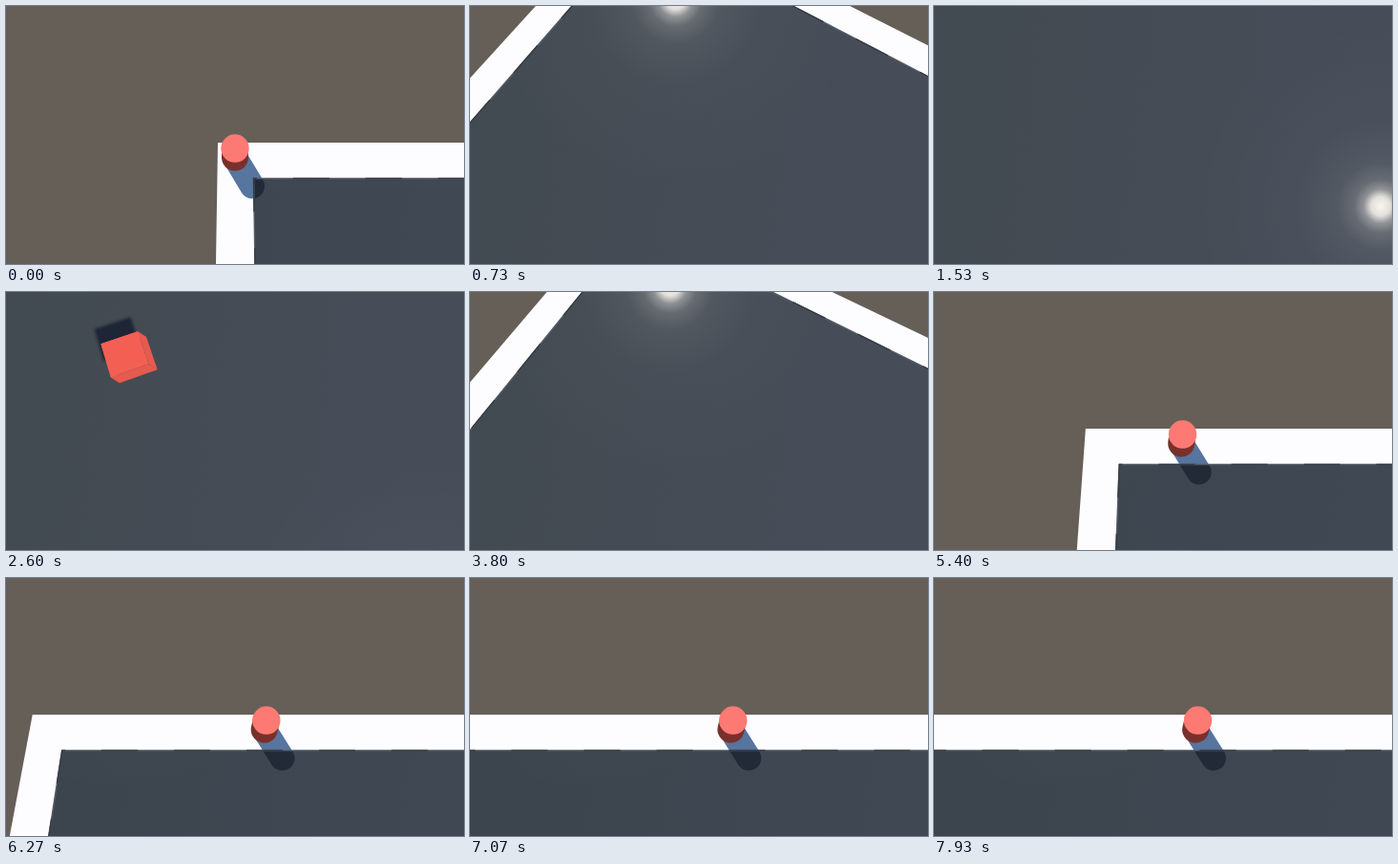
Animation of 480x270 px, one loop 8000 ms. Source, as an HTML page with a canvas:

```html
<!DOCTYPE html>
<html>
<head>
<meta charset="utf-8">
<style>
  html, body { margin: 0; width: 100%; height: 100%; overflow: hidden; background: #434b55; }
  canvas { display: block; }
</style>
</head>
<body>
<canvas id="stage" width="480" height="270"></canvas>
<script>
const ctx = document.getElementById('stage').getContext('2d');
const LOOP = 8000, W = 480, H = 270;
const FOCAL = 234, TILT = 0.206, SIN = Math.sin(TILT), COS = Math.cos(TILT);

// Ground units: camera height is 1, the home camera stands at the origin.
const AWAY = [6.2, -5.55];
const CORNER = [-0.078, 0.174];
const WALL = 0.16;
const GLINT = [-0.604, 0.72];
const SHADOW = [0.075, -0.125];
const CUBE = [AWAY[0] + 0.195, AWAY[1] - 0.373];
const CUBE_YAW = 0.24;

const cam = { x: 0, y: 0, sin: 0, cos: 1 };

const smooth = (t, start, end) => {
  const k = Math.min(1, Math.max(0, (t - start) / (end - start)));
  return k * k * (3 - 2 * k);
};

function project([px, py]) {
  const dx = px - cam.x, dy = py - cam.y;
  const x = dx * cam.cos + dy * cam.sin;
  const y = dy * cam.cos - dx * cam.sin;
  const scale = FOCAL / (COS + y * SIN);
  return [W / 2 + x * scale, H / 2 - (y * COS - SIN) * scale];
}

const add = (a, b) => [a[0] + b[0], a[1] + b[1]];

function trace(points, closed = true) {
  ctx.beginPath();
  points.forEach(p => ctx.lineTo(...p));
  if (closed) ctx.closePath();
}

function fill(points, color) {
  trace(points);
  ctx.fillStyle = color;
  ctx.fill();
}

function stroke(points, color, width) {
  trace(points, false);
  ctx.strokeStyle = color;
  ctx.lineWidth = width;
  ctx.stroke();
}

function fillStage(from, to) {
  const g = ctx.createLinearGradient(0, 0, W, 60);
  g.addColorStop(0, from);
  g.addColorStop(1, to);
  ctx.fillStyle = g;
  ctx.fillRect(0, 0, W, H);
}

function drawFloor(away) {
  fillStage('#424a51', '#464d59');
  ctx.globalAlpha = Math.max(0, 1 - away / 0.16);
  fillStage('#3b444c', '#404854');
  ctx.globalAlpha = 1;

  const [x, y] = project([cam.x + GLINT[0], cam.y + GLINT[1]]);
  const glow = ctx.createRadialGradient(x, y, 0, x, y, 200);
  [[0, 0.97], [0.05, 0.85], [0.09, 0.4], [0.14, 0.18], [0.23, 0.07], [0.45, 0.02], [1, 0]]
    .forEach(([at, a]) => glow.addColorStop(at, `rgba(255,250,242,${a})`));
  ctx.fillStyle = glow;
  ctx.fillRect(0, 0, W, H);
}

// The region beyond an L-shaped edge, inset from the outer corner.
function beyond(inset) {
  return [[4, -inset], [inset, -inset], [inset, -4], [-3, -4], [-3, 3], [4, 3]]
    .map(p => project(add(CORNER, p)));
}

function drawCorner(spot) {
  const base = project(spot), tip = project(add(spot, SHADOW));
  const inner = beyond(WALL), edge = inner.slice(0, 3);
  ctx.lineCap = 'round';
  stroke([base, tip], '#222a38', 26);

  ctx.save();
  trace(inner);
  ctx.clip();
  fill(inner, '#fdfcff');
  stroke([base, tip], '#56759f', 26);
  ctx.restore();

  ctx.lineCap = 'butt';
  stroke(edge, '#535b65', 1.5);
  ctx.setLineDash([38, 38]);
  stroke(edge, '#343b45', 1.5);
  ctx.setLineDash([]);
  fill(beyond(0), '#655f58');

  const top = [base[0] + (base[0] - 240) * 0.07, base[1] - 9.5];
  ctx.lineCap = 'round';
  stroke([base, top], '#79302b', 28);
  ctx.beginPath();
  ctx.arc(...top, 14.7, 0, 7);
  ctx.fillStyle = '#fc7a73';
  ctx.fill();
}

function drawCube() {
  const corners = [0, 1, 2, 3].map(i => {
    const a = CUBE_YAW + Math.PI * (i / 2 - 0.75);
    return add(CUBE, [0.133 * Math.cos(a), 0.133 * Math.sin(a)]);
  });
  const top = corners.map(project);
  const mid = project(CUBE);
  const lean = [(240 - mid[0]) * 0.08, (184 - mid[1]) * 0.05];
  const base = top.map(p => add(p, lean));

  ctx.filter = 'blur(1.5px)';
  fill(corners.map(p => add(project(add(p, SHADOW)), lean)), '#1d2536');
  ctx.filter = 'none';
  top.forEach((p, i) => {
    const j = (i + 1) % 4;
    fill([p, top[j], base[j], base[i]], '#e65a4f');
  });
  fill(top, '#f35f53');
}

function draw(now) {
  const t = now % LOOP;
  const away = smooth(t, 200, 2160) - smooth(t, 2356, 4316);
  const walk = Math.max(0, t - 4900) / 1000;
  const walked = 0.71 * walk;
  const lead = 0.147 * (1 - Math.exp(-1.63 * walk));

  cam.x = AWAY[0] * away + walked - lead;
  cam.y = AWAY[1] * away;
  cam.sin = Math.sin(Math.PI * away);
  cam.cos = Math.cos(Math.PI * away);

  drawFloor(away);
  if (away < 0.35) drawCorner([walked, 0.106]);
  if (away > 0.6) drawCube();
  requestAnimationFrame(draw);
}
requestAnimationFrame(draw);
</script>
</body>
</html>
```
